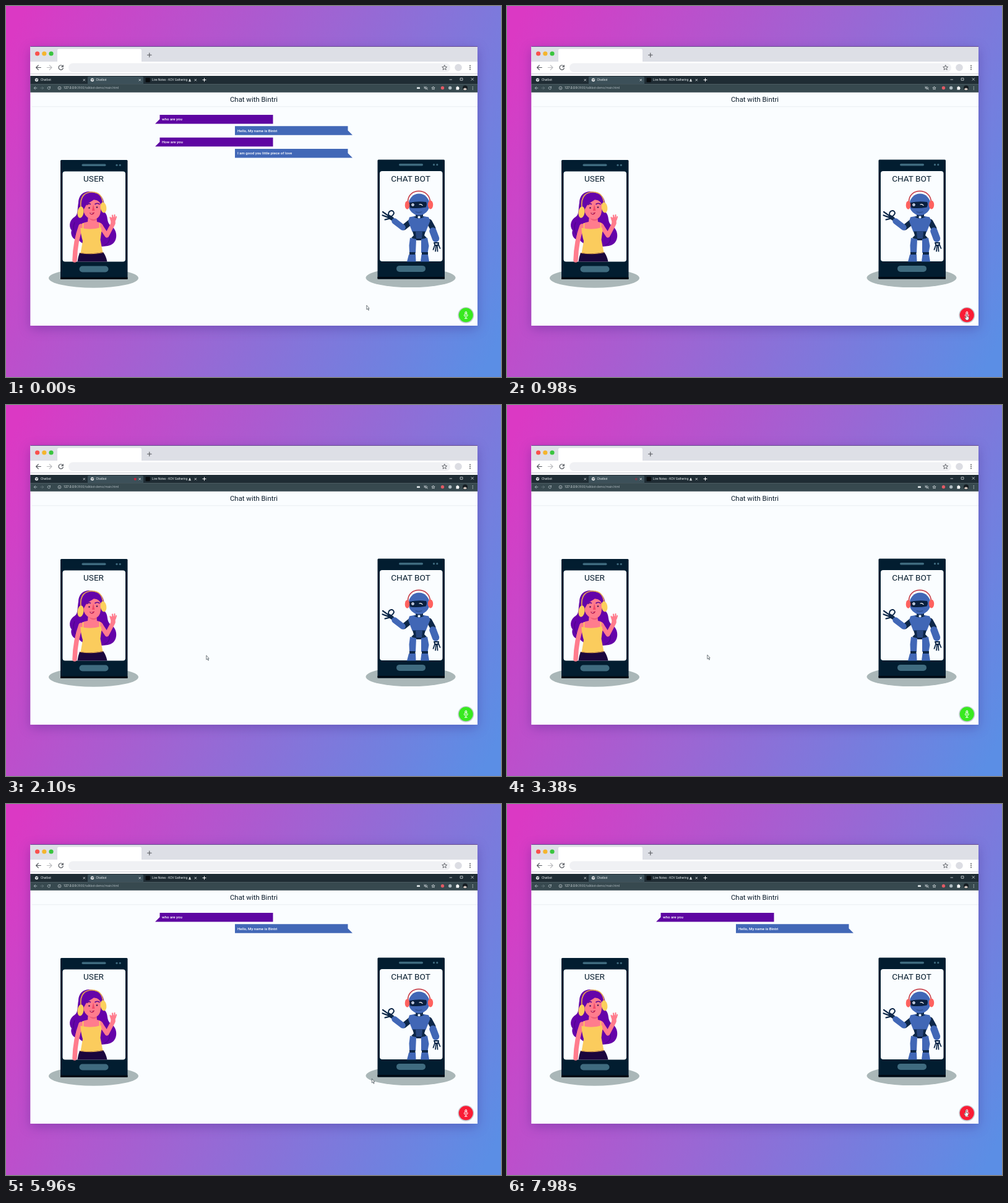
Animation of 800 by 600 pixels, one loop 8000 ms. Source, as an HTML page:

```html
<!DOCTYPE html>
<html lang="en">
<head>
<meta charset="utf-8">
<title>Chat demo</title>
<style>
  html, body { margin: 0; width: 100%; height: 100%; overflow: hidden; }
  body { background: linear-gradient(116deg, #db39c4 3%, #9d65d3 50%, #5b8ee5 97%); }
  svg { display: block; width: 800px; height: 600px; font-family: Roboto, sans-serif; }
  .window { filter: drop-shadow(0 5px 9px rgba(50, 20, 120, .3)); }
  .small { font-size: 4.8px; fill: #e4eaec; }
  .message { font-size: 6.1px; font-weight: 500; fill: #fff; }
  .line { fill: none; stroke-linecap: round; stroke-linejoin: round; }
</style>
</head>
<body>
<svg viewBox="0 0 800 600">
  <defs>
    <g id="phone">
      <ellipse cx="141.5" cy="440" rx="72.5" ry="15.7" fill="#aab7b8"/>
      <rect x="88" y="249" width="108.5" height="193" rx="1.5" fill="#021d30"/>
      <path d="M88 438.5h108.5v3.5h-108.5z" fill="#000a14"/>
      <rect x="91.5" y="267.5" width="101.5" height="146" rx="4" fill="#fafdff"/>
      <g fill="#3f6b7f">
        <rect x="122.5" y="255.5" width="39" height="3.5" rx="1.7"/>
        <circle cx="179" cy="257.3" r="1.6"/>
        <circle cx="184.3" cy="257.3" r="1.6"/>
        <rect x="118.5" y="420.5" width="47" height="10" rx="5"/>
      </g>
    </g>
    <g id="globe">
      <circle r="2.7" fill="#f8fafb"/>
      <path d="M-1.5-.8L.2-.4L-.5 1.3M1.2-1.5L1.6.4" class="line" stroke="#394950" stroke-width=".9"/>
    </g>
    <path id="cross" class="line" d="M-1.4-1.4l2.8 2.8m0-2.8l-2.8 2.8" stroke="#e8edef" stroke-width=".8"/>
    <path id="star" d="M0-4L1.1-1.3L4-1L1.8.8L2.5 3.7L0 2.1L-2.5 3.7L-1.8.8L-4-1L-1.1-1.3Z"/>
    <g id="arrows" class="line">
      <path d="M4 0H-3.5M0-3.7L-3.7 0L0 3.7"/>
      <path d="M14 0H21.5M18-3.7L21.7 0L18 3.7" opacity=".4"/>
      <path d="M39.3-2.4A3.7 3.7 0 1 0 40 1M40-3.7V-1.2H37.4"/>
    </g>
  </defs>

  <!-- outer window -->
  <g class="window">
    <rect x="39.3" y="65" width="722.7" height="452" fill="#fafdff"/>
  </g>
  <path d="M39.3 65h722.7v25H39.3z" fill="#dddfe6"/>
  <path d="M39.3 65h722.7v1H39.3z" fill="#654b91"/>
  <path d="M83 90V72q0-2.5 2.5-2.5h131q2.5 0 2.5 2.5v18z" fill="#fff"/>
  <path d="M39.3 90h722.7v23H39.3z" fill="#fff"/>
  <path d="M39.3 109h722.7v1.4H39.3z" fill="#d9dae0"/>
  <circle cx="50.6" cy="77" r="3.6" fill="#f9514c"/>
  <circle cx="61.8" cy="77" r="3.6" fill="#f5b52d"/>
  <circle cx="73" cy="77" r="3.6" fill="#39c53e"/>
  <path d="M228.5 79.3h6.6m-3.3-3.3v6.6" class="line" stroke="#55585d" stroke-width="1.1"/>
  <use href="#arrows" x="52.3" y="99.5" stroke="#54585e" stroke-width="1.2"/>
  <rect x="101" y="92.5" width="617" height="14.5" rx="7.2" fill="#f0f1f4"/>
  <use href="#star" x="708.7" y="99.5" fill="none" stroke="#55595e" stroke-width=".9"/>
  <circle cx="731" cy="99.5" r="5.8" fill="#dcdde3"/>
  <g fill="#505459"><circle cx="750" cy="96.5" r=".9"/><circle cx="750" cy="99.5" r=".9"/><circle cx="750" cy="102.5" r=".9"/></g>

  <!-- recorded browser -->
  <path d="M39.3 113h722.7v13.5H39.3z" fill="#1f2c34"/>
  <path d="M132 126.500V115.5q0-1.5 1.500-1.500h87q1.500 0 1.500 1.500v11z" fill="#3c5059"/>
  <path d="M39.3 126.3h722.7v13.400H39.3z" fill="#37494f"/>
  <use href="#globe" x="49.500" y="119.500"/>
  <use href="#globe" x="139.500" y="119.500"/>
  <rect x="225.500" y="116.200" width="7.300" height="7" rx="1" fill="#080b0e"/>
  <g class="small">
    <text x="56" y="121.200">Chatbot</text>
    <text x="145.500" y="121.200">Chatbot</text>
    <text x="236" y="121.200">Live Notes - KOV Gathering</text>
    <text x="93" y="134.400" font-size="5">127.0.0.9<tspan fill="#a7b3b8">:3900/talkbot-demo/main.html</tspan></text>
  </g>
  <path d="M295 122.300c0-3 4-3 4 0zM296 118.200h2v2h-2z" fill="#d2d8da"/>
  <use href="#cross" x="126.300" y="119.700"/>
  <use href="#cross" x="216.300" y="119.700"/>
  <use href="#cross" x="306.300" y="119.700"/>
  <path d="M318 119.500h5m-2.500-2.500v5" class="line" stroke="#fff"/>
  <path d="M717 119h3.500M734.500 116.700h3.500v3.500H734.500zM752 116.700l3.500 3.500m0-3.500l-3.500 3.500" class="line" stroke="#dce3e6" stroke-width=".8"/>
  <g transform="translate(47.500 132.700) scale(.6)"><use href="#arrows" stroke="#a9b6bb" stroke-width="1.500"/></g>
  <circle cx="86.500" cy="132.700" r="2.400" fill="none" stroke="#d3dade" stroke-width=".7"/>
  <path d="M86.500 132.500v1.500m0-2.800v.2" stroke="#d3dade" stroke-width=".7"/>
  <rect id="micAllowed" x="664" y="131.300" width="5" height="2.800" rx=".7" fill="#dde4e7"/>
  <path d="M676 132.500q2.500-3.500 5 0q-2.500 3.500-5 0m-.2-2l5.500 4.500" class="line" stroke="#d3dade" stroke-width=".9"/>
  <g transform="translate(690.500 132.700) scale(.65)"><use href="#star" fill="none" stroke="#dce3e6" stroke-width="1.200"/></g>
  <circle cx="705.500" cy="132.500" r="2.700" fill="#e15a64"/>
  <circle cx="717.700" cy="132.500" r="2.700" fill="#aebbc1"/>
  <path d="M727.500 130.800h1.500q.7-2.500 1.500 0h1.500v1.500q2 .8 0 1.500v1.700h-4.500z" fill="#fff"/>
  <circle cx="742" cy="132.500" r="4" fill="#151b20"/>
  <path d="M738.800 134.800q3-4.500 6.200 0a4 4 0 0 1-6.200 0" fill="#d3c8c1"/>
  <g fill="#dce3e6"><circle cx="754.300" cy="130.500" r=".6"/><circle cx="754.300" cy="132.700" r=".6"/><circle cx="754.300" cy="134.900" r=".6"/></g>
  <circle id="recording" cx="208.800" cy="119.800" r="2.100" fill="#d91f38"/>

  <!-- page -->
  <path d="M42 162.800h720" stroke="#e9eef1"/>
  <text x="400.500" y="154.800" font-size="11.400" text-anchor="middle" fill="#0b1b2a">Chat with Bintri</text>
  <g id="messages"></g>
  <use href="#phone"/>
  <use href="#phone" x="512.500" y="-.6"/>
  <g font-size="13.600" text-anchor="middle" fill="#061c2d">
    <text x="141.500" y="283.700">USER</text>
    <text x="654" y="283.700">CHAT BOT</text>
  </g>

  <!-- user -->
  <g>
    <path d="M117 318C118 298 136 298 143 302C157 304 161 318 158 332C167 340 161 348 169 355C182 362 181 383 168 387C155 391 126 390 118 379C106 379 104 367 106 363C100 355 104 345 111 341C117 337 115 328 117 318Z" fill="#6503a9"/>
    <path d="M162 364C170 372 169 383 159 387M111 350C106 362 111 371 118 374" class="line" stroke="#4c078b" stroke-width="1.200"/>
    <g class="line" stroke="#ff7c8d">
      <path d="M121 356Q112 380 111 411" stroke-width="7.500"/>
      <path d="M153 356L163 371L173 352" stroke-width="7"/>
      <path d="M173 350V345" stroke-width="7.500"/>
      <path d="M170 347L168.500 342M172.500 345L172 338.500M175 345L175.500 338M176.500 346L178 341" stroke-width="2.200"/>
    </g>
    <path d="M133 338h13l1 11q9 1 11 9l-5 10h-31l-4-10q2-7 14-9z" fill="#ff7c8d"/>
    <path d="M133 342q7 5 13-1v5q-7 4-13-4z" fill="#ef5e78"/>
    <path d="M125 320Q139 308 153 317V331Q152 344 142 345Q129 344 126 334Z" fill="#ff7c8d"/>
    <path d="M124 330C122 314 132 307 143 306C151 306 155 314 154 322C151 316 147 313 142 313C136 318 131 319 129 323Q127 328 124 330Z" fill="#6503a9"/>
    <path d="M131 321.500q3-3 5.500-1M144 320.500q3.500-2.500 7 0" class="line" stroke="#5a0797" stroke-width="1.600"/>
    <circle cx="134.500" cy="326.500" r="1.200" fill="#37114f"/>
    <circle cx="147" cy="325.500" r="1.200" fill="#37114f"/>
    <path d="M141 321l-2 10 4.500 0z" fill="#ef4968"/>
    <path d="M135 334q4 1.500 8-.5-1 4-4.500 4-3-.5-3.500-3.500" fill="#b91c4f"/>
    <path d="M136 334.800q3 .7 5.500-.2-3 2.200-5.500.2" fill="#fff"/>
    <path d="M121 326C119 307 128 301 139 301C150 301 156 308 157 320" class="line" stroke="#e7a94e" stroke-width="1.700"/>
    <ellipse cx="120.500" cy="333.500" rx="5" ry="9.300" transform="rotate(8 120.500 333.500)" fill="#fbd05d"/>
    <ellipse cx="157.500" cy="326" rx="4.800" ry="8.500" transform="rotate(-8 157.500 326)" fill="#fbd05d"/>
    <path d="M124.500 351v12M151.500 351v12" stroke="#fbcc5d" stroke-width="1.700"/>
    <path d="M121.500 359q16 4 32-1l1 5-2 15 4 21q-18 4-36 1l3.500-20q-3.500-11-3.500-21z" fill="#fbcc5d"/>
    <path d="M119 399q18 3 38-1 5 7 6.500 15.500H115.500q1-8 3.500-14.500" fill="#1b063d"/>
    <path d="M120 399.500q18 3 36.500-.8" class="line" stroke="#e0a347"/>
  </g>

  <!-- robot -->
  <g>
    <g class="line" stroke="#0d2748">
      <path d="M654 349L643 358M684 349L690 360" stroke-width="9"/>
      <path d="M624 344L619.500 341" stroke-width="6"/>
      <path d="M619 340L609 333M618 342L608.500 338.500M619 344L612.500 345.500" stroke-width="2.200" stroke-dasharray="4 .7"/>
      <path d="M618.500 339C616 331 626 328 627 335Q626 338 623 340" stroke-width="2" stroke-dasharray="3.500 .7"/>
      <path d="M692 383H699L698 387H693.500Z" stroke-width="2"/>
      <path d="M693 387L690.500 394M695 388L694 397M697 388L697.500 397M699 386L701.500 392" stroke-width="1.800" stroke-dasharray="4 .7"/>
    </g>
    <g class="line" stroke="#4167b6" stroke-width="9.500">
      <path d="M641 358L628 348"/>
      <path d="M690 364L694.500 376" stroke-width="11.500"/>
    </g>
    <path d="M662 336h12v7h-12z" fill="#0d2748"/>
    <path d="M652 341.500q15.500-4 31 0l2.500 6-7 17.500-9 2-13-2-6.500-17z" fill="#4167b6"/>
    <path d="M659 341q8 5 17 0-8-3-17 0" fill="#0d2748"/>
    <circle cx="667.500" cy="341.500" r="2.100" fill="#eef6ff"/>
    <path d="M657 364.500h21l-2 6.500 4 4-9 4h-7l-9-4 4-4z" fill="#0d2748"/>
    <path d="M662 365h11l-1 11h-9z" fill="#28477f"/>
    <path d="M653 375l10 2-1 22h-10l-.5-12zM681 375l-10 2 0 22h10.500l2-11z" fill="#4167b6"/>
    <path d="M652 398h9.500v5h-9.500zM672 398h10v5h-10z" fill="#0d2748"/>
    <path d="M651 402h11l.5 11.500h-14.500zM671.500 402h10.500l2 11.500h-14z" fill="#4167b6"/>
    <ellipse cx="667.500" cy="321" rx="17" ry="17.500" fill="#4167b6"/>
    <path d="M652 318q14-3 27-1 2 4-.5 8.500-13 2.500-25 1-3-5-1.500-8.500" fill="#091f3f"/>
    <circle cx="657.500" cy="321.500" r="2.200" fill="#fff"/>
    <circle cx="657.500" cy="321.500" r=".9" fill="#4167b6"/>
    <path d="M668 321q3-1 5 1.500" class="line" stroke="#fff" stroke-width="1.200"/>
    <path d="M662 333q5 2 10 0" class="line" stroke="#28477f"/>
    <path d="M649.500 317C649 293.500 685 293.500 685.500 317" class="line" stroke="#c8444e" stroke-width="1.700"/>
    <ellipse cx="648.500" cy="322" rx="3.800" ry="6.800" fill="#ff625f"/>
    <ellipse cx="686" cy="321.500" rx="4.200" ry="7" fill="#ff625f"/>
  </g>

  <circle cx="743.300" cy="500" r="13" fill="#8b9aa3" opacity=".5"/>
  <circle id="button" cx="743.300" cy="499.800" r="11.500"/>
  <g class="line" stroke="#fff">
    <rect x="741.800" y="494.300" width="3" height="6.500" rx="1.500" stroke-width=".9"/>
    <path d="M743.300 496v2" stroke-width="1.200"/>
    <path d="M740.300 499.500c0 4.700 6 4.700 6 0M743.300 503v2.300m-2 0h4" stroke-width=".9"/>
  </g>

  <g id="cursor" stroke="#3b474e" stroke-linejoin="round" fill="#fff">
    <path id="arrow" d="M-1.200-4V2.800L.4 1.500L1.700 4.200L2.600 3.700L1.400 1.100H3.200Z" stroke-width=".7"/>
    <path id="hand" d="M-1-3.500q1-1.300 1.700 0V0l2.800 1v2.500l-1.200 2.500h-3.200l-2.600-4 .7-.7 1.800 1.300z" stroke-width=".6"/>
  </g>
</svg>
<script>
const LOOP = 8000;
const CLEARED = 420, LISTENING = 1240, ANSWERED = 4200, MIC_OFF = 5200;
const byId = id => document.getElementById(id);
const show = (id, visible) => byId(id).setAttribute('visibility', visible ? 'visible' : 'hidden');

const lines = ['who are you', 'Hello, My name is Bintri', 'How are you', 'I am good you little piece of love'];
byId('messages').innerHTML = lines.map((text, i) => {
  const bot = i % 2;
  const shape = bot ? 'M370 0H552.5V7L560 14.5H370Z' : 'M248.5 0H431.5V14.5H241L248.5 7Z';
  return `<g id="message${i}" transform="translate(0 ${176 + i * 18.35})">
    <path d="${shape}" fill="${bot ? '#4268b7' : '#5e05a2'}"/>
    <text class="message" x="${bot ? 374 : 252}" y="9.4">${text}</text></g>`;
}).join('');

const smooth = p => p * p * (3 - 2 * p);
const easeOut = p => 1 - (1 - p) ** 2;
// Each stop: time, x, y, easing used on the way there.
const path = [
  [0, 584, 488],
  [20, 584, 488, smooth],
  [800, 743, 502, smooth],
  [1240, 743, 502, smooth],
  [2040, 325, 409, smooth],
  [2780, 325, 408, smooth],
  [5740, 325, 408, smooth],
  [5960, 592, 448, smooth],
  [6540, 743, 500, easeOut],
  [6640, 742, 499, smooth],
  [LOOP, 742, 499, smooth]
];

function cursorAt(t) {
  const i = path.findIndex(stop => stop[0] > t);
  const [t0, x0, y0] = path[i - 1], [t1, x1, y1, ease] = path[i];
  const p = ease((t - t0) / (t1 - t0));
  return [x0 + (x1 - x0) * p, y0 + (y1 - y0) * p];
}

function draw(t) {
  const [x, y] = cursorAt(t);
  const overButton = Math.hypot(x - 743, y - 500) < 12;
  byId('cursor').setAttribute('transform', `translate(${x} ${y})`);
  show('arrow', !overButton);
  show('hand', overButton);

  lines.forEach((_, i) => show('message' + i, t < CLEARED || (i < 2 && t >= ANSWERED)));
  show('micAllowed', t < CLEARED || t >= LISTENING);
  show('recording', t >= LISTENING && t < MIC_OFF);
  byId('recording').setAttribute('opacity', .6 + .25 * Math.cos((t - 2100) * Math.PI / 1200));
  const green = t < CLEARED || (t >= LISTENING && t < ANSWERED);
  byId('button').setAttribute('fill', green ? '#38e91f' : '#f91c35');
}

const start = performance.now();
function tick() {
  draw((performance.now() - start) % LOOP);
  requestAnimationFrame(tick);
}
tick();
</script>
</body>
</html>
```
